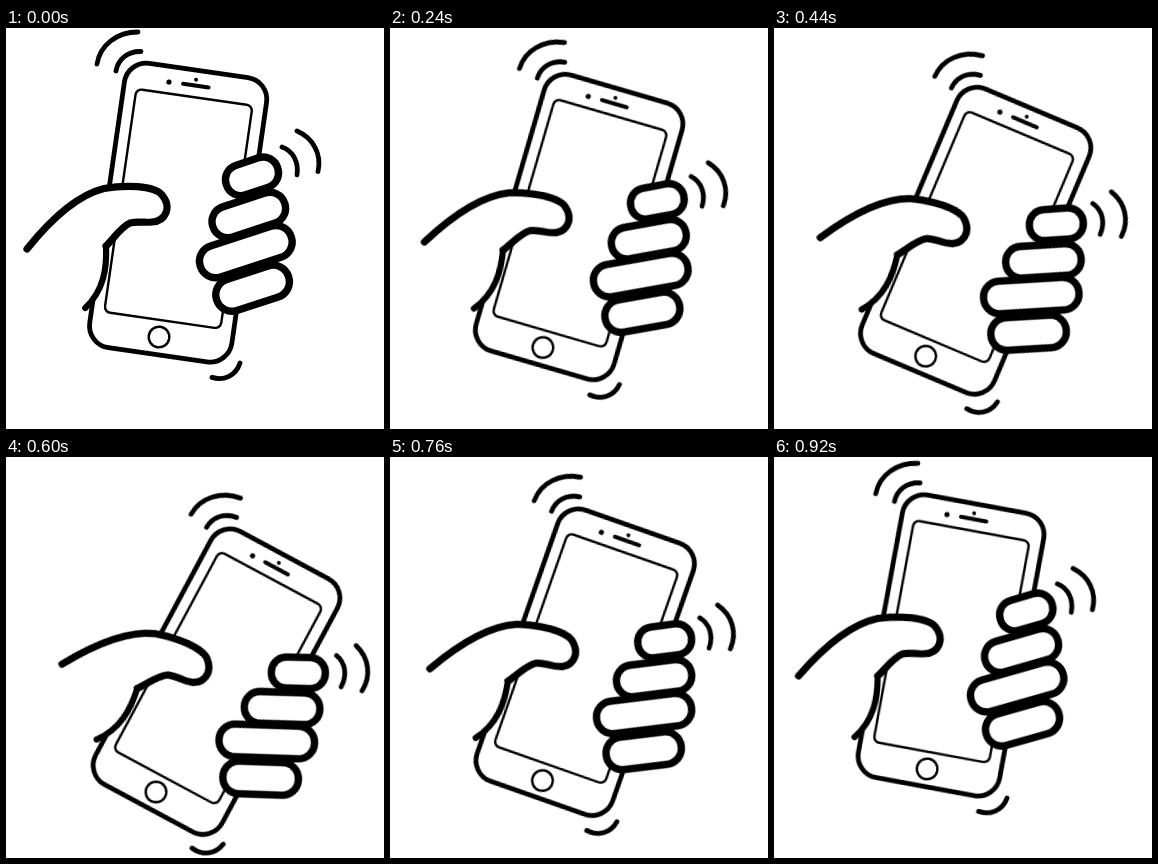
Animation, 378 px wide and 401 px high, one loop 0.96 s. Source, as an HTML page:

```html
<!DOCTYPE html>
<html lang="en">
<head>
<meta charset="utf-8">
<title>Shaking phone</title>
<style>
  html, body { margin: 0; width: 100%; height: 100%; overflow: hidden; background: #fff; }
  svg { display: block; width: 100vw; height: 100vh; }
  .shake {
    fill: none; stroke: #000; stroke-linecap: round; stroke-linejoin: round;
    transform-origin: 77.8px 313.5px;
    animation: shake 960ms infinite;
  }
  /* slow tilt out, quick return, one pose every 40 ms */
  @keyframes shake {
    0%    { transform: rotate(0deg);  animation-timing-function: steps(15, end); }
    62.5% { transform: rotate(20deg); animation-timing-function: steps(9, end); }
    100%  { transform: rotate(0deg); }
  }
  .body { stroke-width: 4.8; fill: #fff; }
  .thin { stroke-width: 2.4; }
  .dot { fill: #000; stroke: none; }
  .hand { fill: #fff; stroke: none; }
  .line { stroke-width: 7.2; }
  .wrist { stroke-width: 6.2; }
  .fingers { fill: #fff; stroke-width: 7.4; }
  .waves { stroke-width: 4.8; }
</style>
</head>
<body>
<svg viewBox="0 0 378 401">
  <g class="shake">
    <g transform="translate(153 309) rotate(8.2)">
      <rect class="body" x="-70.6" y="-269.5" width="143.6" height="287.3" rx="22"/>
      <rect class="thin" x="-57.8" y="-242.4" width="117.4" height="225.4" rx="6"/>
      <circle class="thin" r="10.3"/>
      <circle class="dot" cx="-26.5" cy="-253.8" r="2.6"/>
      <circle class="dot" cy="-260" r="2"/>
      <path stroke-width="4" d="M-12.3 -254H13.5"/>
    </g>

    <path class="hand" d="M21 221C45 191 72 167 98 160.5C118 157 148 157 156 167C166 179 160 193 146 194C139 195 132 193 124 195C115 199 108 210 100 218C101 240 98 262 79.3 280Z"/>
    <path class="line" d="M21 221C45 191 72 167 98 160.5C118 157 148 157 156 167C166 179 160 193 146 194C139 195 132 193 124 195C115 199 108 210 100 218"/>
    <path class="wrist" d="M100 218C101 240 98 262 79.3 280"/>

    <g class="fingers">
      <rect x="-27" y="-15.5" width="54" height="31" rx="15" transform="translate(246 148.3) rotate(-18.5)"/>
      <rect x="-37.8" y="-15.8" width="75.6" height="31.6" rx="15.5" transform="translate(242.8 187) rotate(-18)"/>
      <rect x="-47.8" y="-16.3" width="95.6" height="32.6" rx="16" transform="translate(239.8 223.6) rotate(-18)"/>
      <rect x="-37.8" y="-16.3" width="75.6" height="32.6" rx="16" transform="translate(246.6 260.2) rotate(-18)"/>
    </g>

    <g class="waves">
      <path d="M91 36C94 17 111 4 132 4"/>
      <path d="M110 43C112 31 122 23 135 23.5"/>
      <path d="M276 119C287 123 293 134 291 147"/>
      <path d="M291 103C307 110 316 126 312 143.5"/>
      <path d="M206 349.4C218 353.4 230 347.4 234 335"/>
    </g>
  </g>
</svg>
</body>
</html>
```
